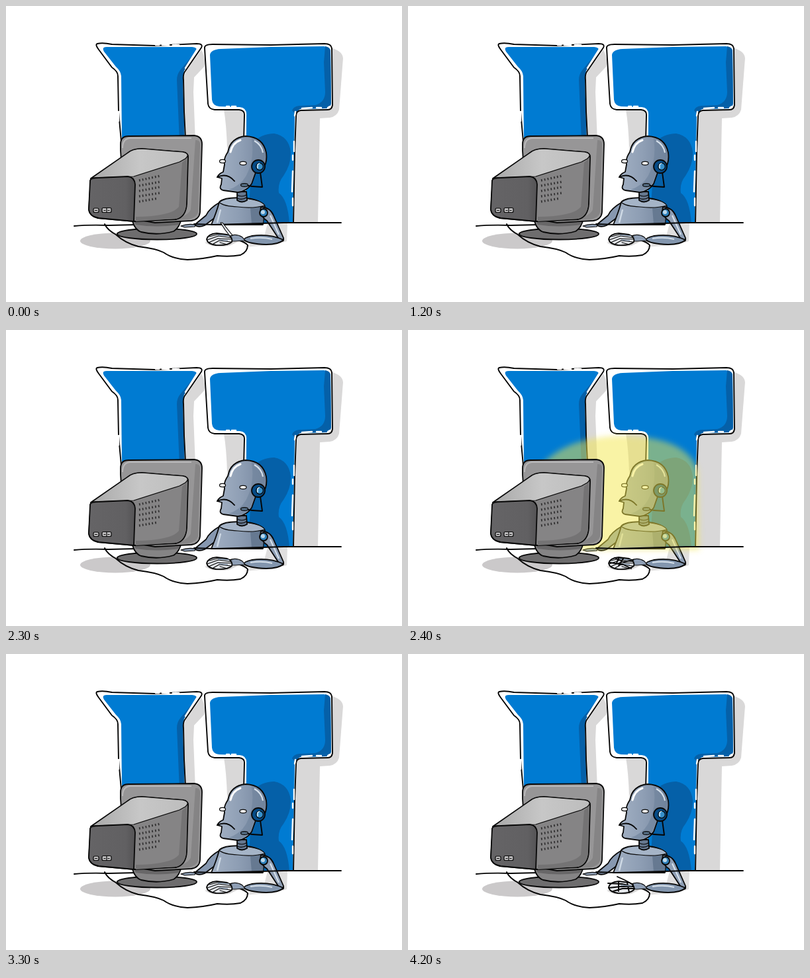
These frames come from a looping animation (598x448 px, 4400 ms). An HTML page:

```html
<!DOCTYPE html>
<html lang="en">
<head>
<meta charset="utf-8">
<title>IT helpdesk robot</title>
<style>
html, body { margin: 0; width: 100%; height: 100%; overflow: hidden; background: #fff; }
svg { display: block; width: 100%; height: 100%; }
.line { fill: none; stroke: #050505; stroke-width: 1.9; stroke-linecap: round; stroke-linejoin: round; }
.ink { stroke: #080808; stroke-width: 1.8; stroke-linecap: round; stroke-linejoin: round; }
.thin { stroke-width: 1.2; }
.shade { fill: #d9d8d8; }
.blue { fill: #007bd2; }
.deep { fill: #0560a8; }
.steel { fill: #8e9eb4; }
.shine { fill: none; stroke: #fff; stroke-width: 2.4; stroke-linecap: round; }
#glow, #grip, #tap { visibility: hidden; }
</style>
</head>
<body>
<svg viewBox="0 0 598 448" preserveAspectRatio="none">
<defs>
  <filter id="soft" x="-10%" y="-10%" width="120%" height="120%"><feGaussianBlur stdDeviation="4"/></filter>
  <linearGradient id="back">
    <stop offset="0" stop-color="#656466"/><stop offset=".8" stop-color="#616062"/><stop offset="1" stop-color="#545355"/>
  </linearGradient>
  <linearGradient id="lid">
    <stop offset="0" stop-color="#a9a9a9"/><stop offset=".5" stop-color="#c7c7c7"/><stop offset="1" stop-color="#bdbdbd"/>
  </linearGradient>
  <linearGradient id="metal">
    <stop offset="0" stop-color="#a2b0c3"/><stop offset=".5" stop-color="#8e9eb4"/><stop offset="1" stop-color="#74859d"/>
  </linearGradient>
</defs>

<!-- wall shadows -->
<g class="shade">
  <path d="M295 66Q303 82 299 92L284 108 283 130 286 205H270L267 112 272 98Z"/>
  <path d="M329 157H362L359 205Q345 200 334 216Q333 180 329 157Z"/>
  <path d="M492 64Q508 68 509 79L503 157Q500 167 489 169L474 170 471 328H434L437 157 492 155Z"/>
</g>

<!-- letter I -->
<path fill="#fff" d="M137 57L291 57Q297 58 294 64L271 99Q267 104 268 112L271 205H173L169 106Q168 98 160 92Z"/>
<path class="blue" d="M152 62L281 62Q292 63 285 72L265 97 260 113 266 205H175L174 106Q173 98 166 92L148 69Q144 62 152 62Z"/>
<path class="deep" d="M287 65L291 64 269 98 267 112 270 205H262L258 112Q258 103 264 96L283 73Z"/>
<path class="line" d="M174 205L170 160 169 106Q169 99 160 93L140 66Q134 58 138 57 146 55 160 58L225 60 288 57Q298 57 295 63L271 98Q267 103 268 112L269 160 271 200"/>
<path class="shine" d="M226 59H231M236 59H246M252 59H261M291 62L271 94M170 160V174"/>

<!-- letter T -->
<path fill="#fff" d="M300 61Q302 58 312 58L481 57Q491 57 492 64L493 150Q492 157 486 157L445 158Q438 159 438 166L434 328H359L360 166Q361 158 352 157L315 157Q306 156 305 148Z"/>
<path class="blue" d="M308 74Q309 66 324 65L400 62 480 61Q490 62 490 69L491 147Q490 155 482 155L444 156Q437 158 436 166L433 328H362L363 166Q364 154 353 153L322 152Q312 151 311 142Z"/>
<path class="deep" d="M482 61Q490 62 490 69L491 147Q490 155 482 155L444 156 436 163 432 158Q434 152 443 151L467 150Q482 146 482 130L480 85Z"/>
<path class="deep" d="M372 207Q386 193 405 193 427 197 430 221 431 239 419 257 410 268 412 283 425 292 428 328H366Z"/>
<path class="line" d="M359 204L360 166Q361 158 352 157L315 157Q306 156 305 148L300 64Q299 58 312 58L400 59 481 57Q491 57 492 64L493 150Q492 157 486 157L445 158Q438 159 438 166L436 220 434 328"/>
<path class="shine" d="M489 152L486 154M469 154H476M447 155L462 154M437 160L436 166M333 152H337M341 152H347M435 205V220M433 226V233M433 250L432 281M433 291V302"/>

<!-- robot -->
<path class="ink" fill="#8798b0" d="M323 297Q307 306 302 317L285 331Q290 336 300 332L316 320Z"/>
<path class="ink thin steel" d="M286 331Q274 329 264 333L270 335 285 334Z"/>
<path class="ink" fill="url(#metal)" d="M322 297Q318 312 310 331H388L391 304Q387 293 357 290 326 290 322 297Z"/>
<path fill="#667991" d="M369 306L390 302 388 330H371Z"/>
<path class="ink thin" fill="#a5b4c7" d="M322 297Q332 289 357 291 385 293 391 302 373 307 350 304 328 303 322 297Z"/>
<path fill="none" stroke="#cfdae6" stroke-width="2.5" d="M324 308L319 328"/>
<path class="ink" fill="#66788f" d="M349 281L349 294Q356 299 364 294L363 281Z"/>
<path class="line thin" d="M349 286Q356 290 363 286M349 291Q356 294 363 290"/>
<path class="ink" fill="url(#metal)" d="M335 221Q339 199 362 197 388 198 393 222 395 237 388 246L377 252 371 269Q363 281 350 282L328 279Q321 277 325 270L326 261 319 259Q321 254 328 251L330 240Q328 231 335 221Z"/>
<path fill="#6f829b" opacity=".6" d="M371 201Q389 207 391 225L386 245 376 251 369 269Q362 279 350 280L336 278Q354 272 362 258 376 234 371 201Z"/>
<path class="line" d="M319 259Q334 252 345 265"/>
<path fill="none" stroke="#fff" stroke-width="3" stroke-linecap="round" d="M339 221Q342 207 354 203"/>
<path fill="none" stroke="#d7e1eb" stroke-width="2" d="M375 204Q386 210 388 222"/>
<g class="ink thin" fill="#fff">
  <ellipse cx="327" cy="235" rx="4.5" ry="2.6"/>
  <ellipse cx="358" cy="238" rx="5" ry="2.7"/>
</g>
<path class="line" d="M384 252L387 274Q373 274 360 271"/>
<ellipse class="ink thin" cx="360" cy="271" rx="5.5" ry="2.4" fill="#587188"/>
<circle class="ink" cx="381" cy="243" r="10" fill="#064b86"/>
<circle class="ink thin" cx="383" cy="243" r="5.3" fill="#3790cb"/>
<path fill="none" stroke="#d5edff" stroke-width="1.5" d="M380 246V240L383 238"/>
<path class="shade" d="M395 329H425L424 356 408 361 360 365 390 348Z" opacity=".8"/>
<path class="ink steel" d="M385 304Q399 305 404 317L419 351Q420 359 413 354L394 325Q382 317 385 304Z"/>
<path fill="none" stroke="#d9e3ed" stroke-width="2" d="M399 317L412 346"/>
<circle class="ink" cx="389" cy="313" r="6" fill="#2e80bb"/>
<circle cx="388" cy="312" r="3" fill="#bdd7e9"/>

<!-- screen light -->
<path id="glow" filter="url(#soft)" fill="#f3e84b" fill-opacity=".5"
  d="M190 222Q222 162 325 160 424 162 438 215L440 333H200Z"/>

<!-- desk -->
<path class="line" d="M103 333Q125 331 155 332L197 331M284 330L315 331 420 328 506 328"/>
<ellipse cx="165" cy="355.5" rx="53" ry="12" fill="#cbc9ca"/>
<path class="line" d="M149 330Q153 339 166 346 180 359 200 364 226 367 238 373 252 383 274 384 298 383 319 378 338 380 354 377 365 372 365 362 361 357 349 354"/>

<!-- monitor -->
<ellipse class="ink" cx="228" cy="345" rx="60" ry="8.5" fill="#6e6d6e"/>
<path class="ink" fill="#858485" d="M190 321Q193 338 204 342 229 348 253 341 262 336 265 321Z"/>
<path fill="#686768" d="M193 326L264 322 261 331Q230 336 196 331Z"/>
<path class="ink" fill="#979697" d="M173 219L173 209Q173 197 185 197L284 196Q296 197 296 209L293 312Q292 323 280 325L225 328 180 320Z"/>
<path fill="#858485" d="M286 203Q294 202 293 212L290 312Q288 321 274 323L245 325Q275 319 279 308Z"/>
<path fill="none" stroke="#b9b8b9" stroke-width="2" d="M176 215Q176 201 187 200L280 200"/>
<path class="ink" fill="#858485" d="M128 261L183 223Q191 216 205 216L267 221Q276 222 275 230L273 299Q272 319 257 323L195 326 138 321Q126 318 125 308Z"/>
<path class="ink thin" fill="url(#lid)" d="M130 260L183 223Q191 216 205 216L267 221Q279 224 271 231L262 236 193 258Z"/>
<path fill="#747374" d="M266 237L273 231 272 300Q270 319 256 322L196 326V319Q250 318 261 304Z"/>
<path class="ink" fill="url(#back)" d="M127 264Q128 260 140 260L184 258Q194 259 195 270L193 326 140 321Q126 318 125 308Z"/>
<path fill="none" stroke="#2f2e2f" stroke-width="3.4" stroke-dasharray="1.7 3.2" d="M201 264L233 257M201 272L233 266M201 280L232 274M201 288L232 283M201 296L230 291"/>
<g fill="#bcbbbc" class="ink thin">
  <rect x="132" y="306" width="8" height="6.5" rx="2"/>
  <rect x="145" y="305.5" width="14" height="7" rx="2"/>
  <path d="M134.5 309.5H137.5M148 309.5H150M154 309.5H156M152 306V312"/>
</g>

<!-- forearm and hand -->
<path class="ink" fill="#8396ae" d="M419 354Q397 344 371 348 359 351 359 354 366 360 393 361 412 361 419 354Z"/>
<path fill="none" stroke="#d7e1eb" stroke-width="2" d="M369 352Q386 349 402 353"/>
<path class="shade" d="M300 358Q314 367 337 363L350 357 320 354Z"/>
<path class="ink thin steel" d="M337 348Q348 344 357 350L361 355 346 356 336 356Z"/>
<path class="ink" fill="#e5e8ec" d="M303 353Q305 345 318 344L334 346Q343 350 341 357 335 363 317 362 304 360 303 353Z"/>
<g id="rest">
  <path class="line thin" d="M341 348L323 345 307 349M341 351L321 348 304 354M341 353L320 352 306 358M339 357L322 355 313 360M334 361L323 358"/>
  <path fill="none" stroke="#8496ab" stroke-width="1.3" d="M320 346.5L337 348M322 354L335 355"/>
</g>
<path id="grip" class="line" d="M312 345L326 351 340 348M305 352L325 355 337 361M318 345L315 353M325 346L318 357"/>
<g id="tap">
  <path class="line" d="M316 337L327 342 340 349M302 347L323 348 341 352M303 354L321 352 341 352M310 359L324 355 342 355M318 344V359M331 346L334 361"/>
  <path fill="none" stroke="#8496ab" stroke-width="1.5" d="M321 350L338 351"/>
</g>
<path id="raised" class="ink thin" fill="#e3e7ec" d="M324 328L327 328 334 337 342 347 338 348 331 339Z"/>
</svg>
<script>
const LOOP = 4400, STEP = 100;
const within = (n, ...spans) => spans.some(([from, to]) => n >= from && n < to);

function show(id, on) {
  document.getElementById(id).style.visibility = on ? "visible" : "hidden";
}

// The finger drums on every second step; the screen flickers late in the loop.
function draw() {
  const n = Math.floor(performance.now() % LOOP / STEP);
  const lit = within(n, [24, 25], [26, 27], [30, 33]);
  const drumming = within(n, [3, 17]) ? n % 2 === 1 || n === 16
    : within(n, [17, 23], [33, 37]) && n % 2 === 0;
  const tapping = n >= 42;
  show("glow", lit);
  show("grip", lit);
  show("raised", drumming || within(n, [0, 1], [39, 42]));
  show("tap", tapping);
  show("rest", !tapping);
  requestAnimationFrame(draw);
}
draw();
</script>
</body>
</html>
```
